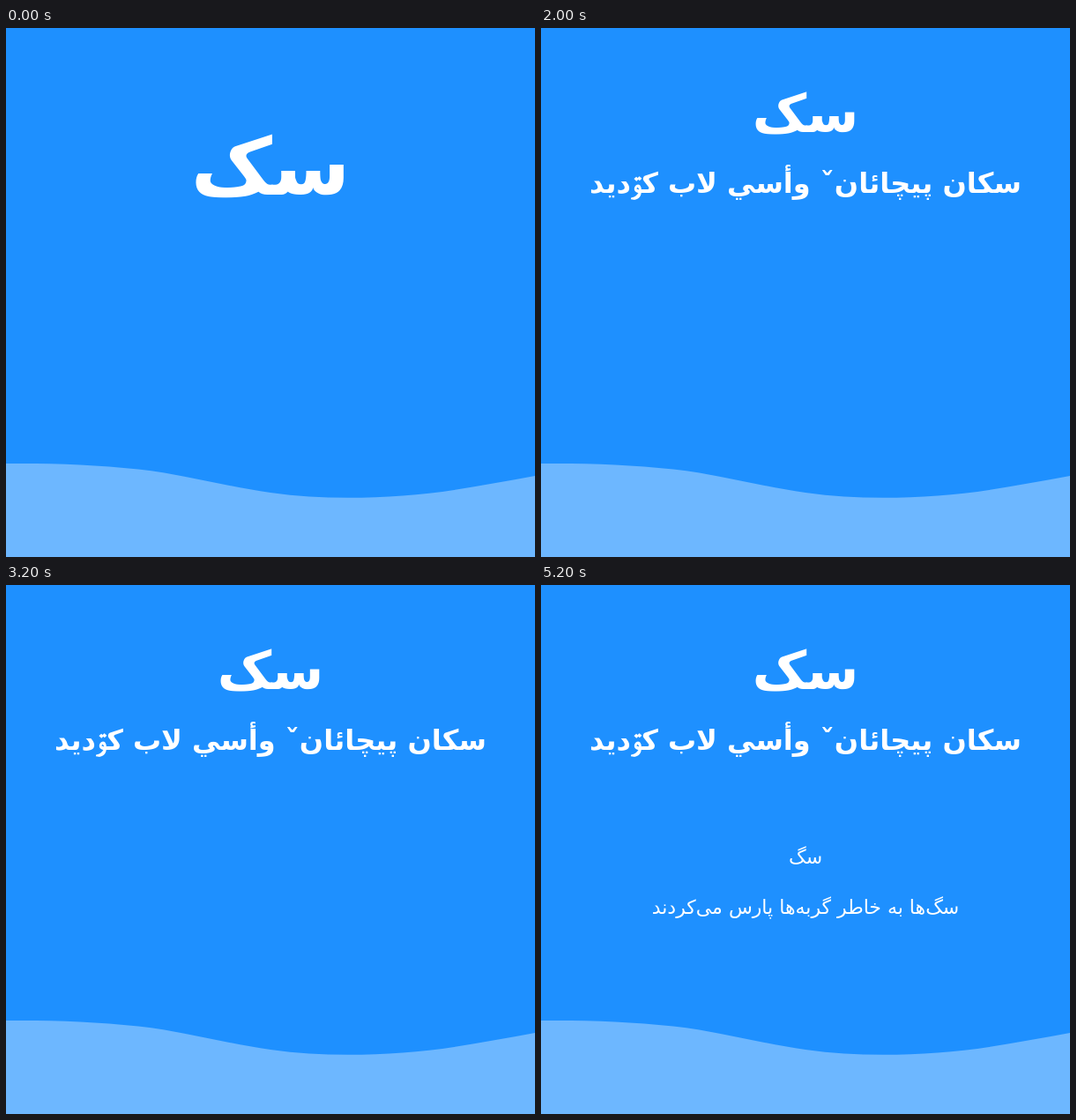
Recreate the animation shown at these times as an HTML page. Size 600 by 600 pixels, loop 6 s.

```html
<!DOCTYPE html>
<html lang="fa">
<head>
<meta charset="utf-8">
<title>سک</title>
<style>
  html, body { margin: 0; height: 100%; overflow: hidden; background: #1e90ff; }
  svg { display: block; width: 100%; height: 100%; }
  text { font-family: "DejaVu Sans", sans-serif; fill: #fff; text-anchor: middle; direction: rtl; }
  .bold { font-weight: 700; }
</style>
</head>
<body>
<svg viewBox="0 0 600 600">
  <path fill="#6db7ff" d="M0 494C50 493.5 100 495 150 500.5S250 520 300 527S400 534 450 530.5S550 517 600 508V600H0Z"/>
  <text id="title" class="bold" x="300">سک</text>
  <text id="sentence" class="bold" x="300" y="187" font-size="32">سکان پیچائانˇ وأسي لاب کۊدید</text>
  <g id="translation" font-size="22">
    <text x="300" y="316">سگ</text>
    <text x="300" y="373">سگ&zwnj;ها به خاطر گربه&zwnj;ها پارس می&zwnj;کردند</text>
  </g>
</svg>
<script>
  const STEP = 2000, STEPS = 3;
  const [title, sentence, translation] =
    ["title", "sentence", "translation"].map(id => document.getElementById(id));
  const show = (el, on) => el.setAttribute("visibility", on ? "visible" : "hidden");

  function draw(now) {
    const step = Math.floor(now / STEP) % STEPS;
    title.setAttribute("font-size", step ? 60 : 90);
    title.setAttribute("y", step ? 118 : 189);
    show(sentence, step >= 1);
    show(translation, step >= 2);
  }

  const start = performance.now();
  function tick() {
    draw(performance.now() - start);
    requestAnimationFrame(tick);
  }
  tick();
</script>
</body>
</html>
```
